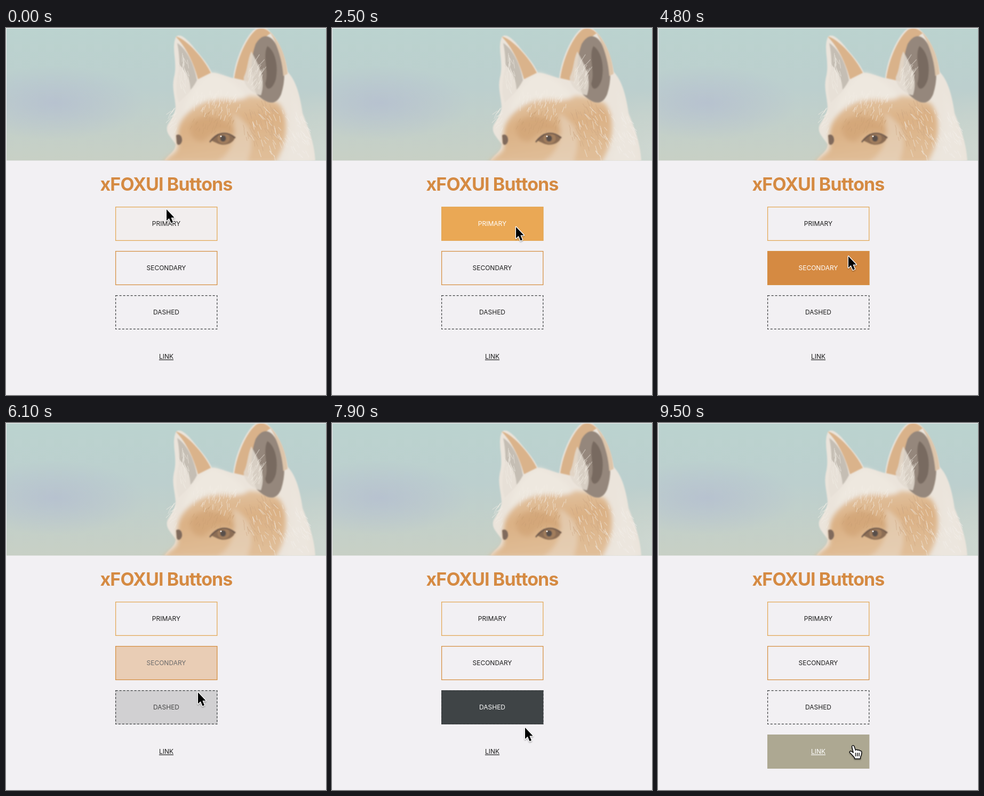
Animation of 600 by 688 pixels, one loop 9600 ms. Source, as an HTML page:

```html
<!DOCTYPE html>
<html lang="en">
<head>
<meta charset="utf-8">
<title>Buttons</title>
<style>
html, body { margin: 0; width: 100%; height: 100%; overflow: hidden; background: #f2f0f3; }
svg { display: block; width: 600px; height: 688px; }
text { font-family: Inter, "Liberation Sans", sans-serif; text-anchor: middle; }
.title { font-size: 34px; font-weight: 700; letter-spacing: -0.9px; fill: #d58a42; }
.label { font-size: 12px; }
</style>
</head>
<body>
<svg viewBox="0 0 600 688" xmlns="http://www.w3.org/2000/svg">
  <defs>
    <linearGradient id="sky" x2="0" y2="1">
      <stop offset="0" stop-color="#bbd3cf"/>
      <stop offset=".45" stop-color="#bccfce"/>
      <stop offset="1" stop-color="#c8d0c5"/>
    </linearGradient>
    <radialGradient id="haze">
      <stop offset="0" stop-color="#b7c2cf"/>
      <stop offset="1" stop-color="#b7c2cf" stop-opacity="0"/>
    </radialGradient>
    <radialGradient id="glow">
      <stop offset="0" stop-color="#cdd7d1"/>
      <stop offset="1" stop-color="#cdd7d1" stop-opacity="0"/>
    </radialGradient>
    <linearGradient id="face" x2=".25" y2="1">
      <stop offset="0" stop-color="#e4c8a9"/>
      <stop offset=".5" stop-color="#dbb185"/>
      <stop offset="1" stop-color="#e0bd97"/>
    </linearGradient>
    <filter id="soft" x="-20%" y="-20%" width="140%" height="140%"><feGaussianBlur stdDeviation="1.2"/></filter>
    <filter id="softer" x="-30%" y="-30%" width="160%" height="160%"><feGaussianBlur stdDeviation="4"/></filter>
    <filter id="shadow" x="-50%" y="-50%" width="200%" height="200%">
      <feDropShadow dx="0" dy="1.5" stdDeviation="1.3" flood-opacity=".35"/>
    </filter>
    <clipPath id="frame"><rect x="1" y="1" width="599" height="247.5"/></clipPath>
  </defs>
  <rect width="600" height="688" fill="#f2f0f3"/>
  <g clip-path="url(#frame)">
    <rect width="600" height="249" fill="url(#sky)"/>
    <ellipse cx="90" cy="140" rx="170" ry="70" fill="url(#haze)"/>
    <ellipse cx="600" cy="230" rx="120" ry="110" fill="url(#glow)"/>
    <path filter="url(#soft)" fill="#ebe4db" d="M297 249C305 236 318 232 318 218C308 203 298 196 303 182C311 168 317 160 318 148C316 122 310 112 316 88C321 60 310 40 318 18C324 7 340 20 355 40C368 56 378 66 386 84C400 84 415 92 426 94C430 60 445 25 462 6C472-4 486-4 494 6C510 22 522 50 528 82C545 100 552 130 556 160C568 190 578 215 580 249Z"/>
    <g filter="url(#softer)">
      <path fill="url(#face)" d="M292 252C312 236 322 232 322 222C320 200 322 182 332 170C352 144 385 130 420 132C446 128 480 122 512 142C532 170 528 215 505 252Z"/>
      <path fill="#e9dac8" d="M425 160C460 178 470 205 452 252H395C420 235 435 212 425 160Z" opacity=".55"/>
      <path fill="#d3a577" d="M345 180C362 160 390 160 410 174C425 184 432 192 428 200C404 188 385 196 372 212C355 214 342 204 345 180Z" opacity=".8"/>
      <path fill="#eee8df" d="M388 84C410 92 432 102 452 130C425 142 410 128 390 136C365 130 350 145 332 160C340 125 362 95 388 84Z"/>
      <path fill="#ece6de" d="M532 110C550 150 566 200 572 252H520C540 215 546 165 532 110Z"/>
    </g>
    <g filter="url(#soft)">
      <path fill="#dab38b" d="M318 16C336 18 372 58 384 84L360 96C352 66 338 36 318 16Z"/>
      <path fill="#c5beb4" d="M321 28C340 40 354 72 358 98C348 118 334 128 326 134C322 110 330 70 321 28Z"/>
      <path fill="#e7e0d7" d="M326 70C338 82 346 98 346 118L324 140C316 118 320 92 326 70Z"/>
      <path fill="#d9b28a" d="M428 94C434 54 452 18 468 4C478-4 490 2 496 10C478 20 460 56 454 100Z"/>
      <path fill="#95877c" d="M468 30C482 6 500 12 512 42C522 66 526 92 516 124C506 148 488 142 470 124C456 94 458 58 468 30Z"/>
      <path fill="#786a61" d="M490 34C502 40 512 66 506 96C500 116 488 120 486 104C494 82 480 54 490 34Z"/>
      <path fill="#e3dbd1" d="M460 44C474 70 488 96 478 126C462 124 444 106 446 92C454 76 452 62 460 44Z" opacity=".85"/>
      <path fill="#ddc5aa" d="M494 6C514 26 526 56 528 86L520 90C518 58 508 30 494 6Z"/>
    </g>
    <g id="fur" fill="none" stroke-width="1.2" stroke-linecap="round"></g>
    <g filter="url(#soft)">
      <path fill="#8b6d54" d="M385 211C393 197 410 192 429 206C426 216 411 222 398 217Z"/>
      <ellipse cx="408" cy="207" rx="11.5" ry="10" fill="#a27e5d"/>
      <ellipse cx="407" cy="207" rx="5.5" ry="6" fill="#584f4c"/>
      <path fill="none" stroke="#695448" stroke-width="2.4" d="M382 214C394 197 412 191 430 206"/>
      <path fill="#806a5b" d="M319 201C326 197 331 204 330 212C327 222 320 220 320 214Z"/>
    </g>
    <circle cx="403" cy="203" r="1.6" fill="#eeeae6"/>
  </g>
  <text class="title" x="300.5" y="305">xFOXUI Buttons</text>
  <g id="buttons"></g>
  <g id="arrow" filter="url(#shadow)">
    <path d="M0 0V21.2L4.8 16.8L8.5 25.4L12 23.9L8.4 15.4H14.6Z" stroke="#fff" stroke-width="2.6" stroke-linejoin="round" paint-order="stroke"/>
  </g>
  <g id="hand" filter="url(#shadow)" fill="#fff" stroke="#111" stroke-width="1.5" stroke-linecap="round" stroke-linejoin="round">
    <path d="M.6 3.2C0 .4 3.8-.5 4.8 2L7.5 9.6C8.6 7.7 11 8 11.7 9.8C12.8 8.3 15.1 8.8 15.6 10.7C17.4 9.8 18.8 11.2 18.9 13.2C19 18 17.8 19.5 16.5 22.5V25.5H5.5V23.3C2.5 20.6.6 17-2.8 14.6C-4.8 12.8-2.7 9.9-.1 11.7L3.2 14Z"/>
    <path fill="none" d="M7.3 14.7L7.7 20.2M10.7 14.7L10.9 20.2M14.1 14.7V20.2"/>
  </g>
</svg>
<script>
const LOOP = 9600, FADE = 500;
const $ = id => document.getElementById(id);

function add(parent, tag, attrs, text) {
  const el = document.createElementNS("http://www.w3.org/2000/svg", tag);
  for (const k in attrs) el.setAttribute(k, attrs[k]);
  if (text) el.textContent = text;
  parent.append(el);
  return el;
}

// Scattered hairs: centre, radii, direction in degrees, length, count, colour
let seed = 7;
const rand = () => (seed = seed * 16807 % 2147483647) / 2147483647;
function hairs(cx, cy, rx, ry, dir, len, count, color) {
  for (let i = 0; i < count; i++) {
    const a = rand() * 2 * Math.PI, r = Math.sqrt(rand());
    const x = cx + rx * r * Math.cos(a), y = cy + ry * r * Math.sin(a);
    const d = (dir + (rand() - .5) * 40) * Math.PI / 180, l = len * (.6 + rand() * .6);
    add($("fur"), "path", {
      d: `M${x.toFixed(1)} ${y.toFixed(1)}l${(l * Math.cos(d)).toFixed(1)} ${(l * Math.sin(d)).toFixed(1)}`,
      stroke: color, opacity: .5
    });
  }
}
hairs(390, 150, 50, 26, -75, 10, 55, "#f3eee6");
hairs(385, 185, 45, 25, -70, 7, 45, "#c99f74");
hairs(480, 180, 38, 45, 65, 11, 55, "#cda884");
hairs(500, 190, 42, 50, 62, 12, 50, "#f1ebe3");
hairs(550, 200, 18, 45, 55, 12, 35, "#f4f0eb");
hairs(335, 90, 10, 35, -105, 14, 25, "#f0ebe4");
hairs(466, 92, 14, 30, -65, 16, 28, "#f0e9e0");
hairs(315, 170, 8, 22, 130, 9, 20, "#f2ede6");

const INK = [28, 28, 28], WHITE = [255, 255, 255];
const buttons = [
  { text: "PRIMARY", y: 335, fill: "#eaa855", edge: "#e2a754", on: -20, off: 3455 },
  { text: "SECONDARY", y: 418, fill: "#d58a42", edge: "#d58f41", on: 3617, off: 5910 },
  { text: "DASHED", y: 501, fill: "#3d4244", edge: "#3a3d3e", on: 6026, off: 7890, dash: "4 3" },
  { text: "LINK", y: 584, fill: "#ada892", edge: "none", on: 8170, off: LOOP, line: true }
];
for (const b of buttons) {
  const g = $("buttons");
  b.bg = add(g, "rect", { x: 205, y: b.y, width: 191.4, height: 64, fill: b.fill });
  add(g, "rect", {
    x: 205.6, y: b.y + .6, width: 190.2, height: 62.8, fill: "none",
    stroke: b.edge, "stroke-width": 1.25, "stroke-dasharray": b.dash || "none"
  });
  b.label = add(g, "text", {
    class: "label", x: 300.5, y: b.y + 36.4, "text-decoration": b.line ? "underline" : "none"
  }, b.text);
}

// cubic-bezier(.25, .1, .25, 1)
function ease(x) {
  if (x <= 0) return 0;
  if (x >= 1) return 1;
  const curve = (a, b, s) => 3 * a * s * (1 - s) ** 2 + 3 * b * s * s * (1 - s) + s ** 3;
  let lo = 0, hi = 1;
  for (let i = 0; i < 24; i++) {
    const mid = (lo + hi) / 2;
    if (curve(.25, .25, mid) < x) lo = mid; else hi = mid;
  }
  return curve(.1, 1, lo);
}

// Pointer path: time, x, y
const path = [
  [0, 301, 340], [400, 318, 352], [1000, 340, 369], [1500, 345, 373],
  [3200, 345, 373], [3455, 350, 400], [3617, 355, 418], [3700, 357, 428],
  [5550, 357, 428], [5910, 358, 482], [6026, 360, 501], [6100, 360, 505],
  [7400, 360, 505], [7880, 362, 566], [7900, 362, 571], [8030, 362, 575],
  [8170, 362, 584], [8500, 363, 604], [LOOP, 363, 604]
];
function pointer(t) {
  const i = path.findIndex(p => p[0] > t);
  const a = path[i - 1], b = path[i], k = (t - a[0]) / (b[0] - a[0]);
  return [a[1] + (b[1] - a[1]) * k, a[2] + (b[2] - a[2]) * k];
}

function draw(t) {
  for (const b of buttons) {
    const k = ease((t - b.on) / FADE) - ease((t - b.off) / FADE);
    b.bg.setAttribute("opacity", k);
    b.label.setAttribute("fill", `rgb(${INK.map((c, i) => Math.round(c + (WHITE[i] - c) * k))})`);
  }
  const [x, y] = pointer(t), onLink = y >= 584;
  $("arrow").setAttribute("display", onLink ? "none" : "inline");
  $("hand").setAttribute("display", onLink ? "inline" : "none");
  for (const id of ["arrow", "hand"]) $(id).setAttribute("transform", `translate(${x} ${y})`);
}

const start = performance.now();
function tick() {
  draw((performance.now() - start) % LOOP);
  requestAnimationFrame(tick);
}
tick();
</script>
</body>
</html>
```
